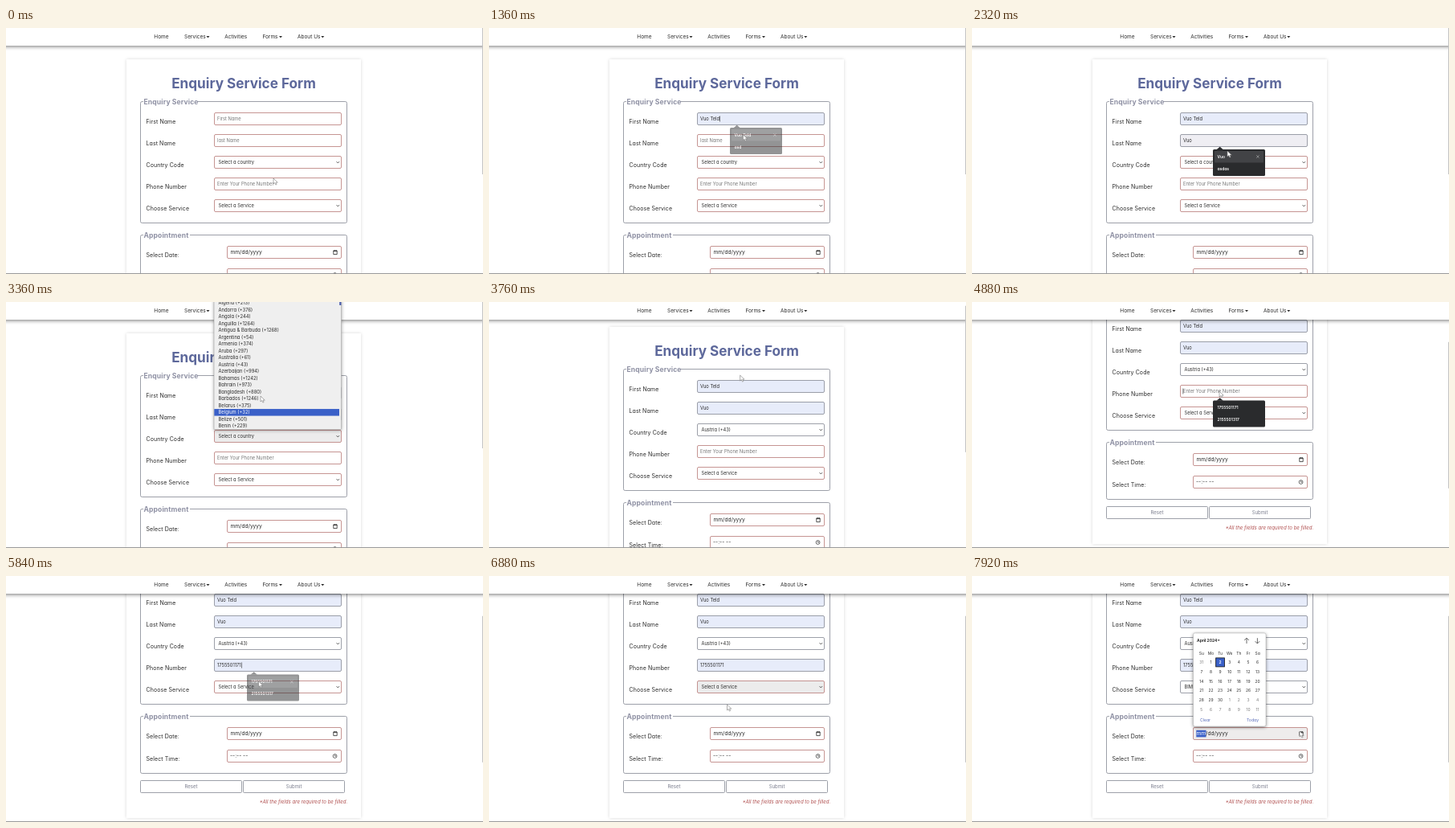
Recreate the animation shown at these times as an HTML page. Size 594x306 px, loop 8000 ms.

```html
<!DOCTYPE html>
<html lang="en">
<head>
<meta charset="utf-8">
<title>Enquiry form</title>
<style>
  html, body { margin: 0; width: 100%; height: 100%; overflow: hidden; background: #fff; }
  svg { display: block; width: 594px; height: 306px; }
  text { font-family: Inter, "Open Sans", sans-serif; font-feature-settings: "cv11"; white-space: pre; }
</style>
</head>
<body>
<svg id="stage" viewBox="0 0 594 306" xmlns="http://www.w3.org/2000/svg">
  <defs>
    <filter id="soft" x="-10%" y="-10%" width="120%" height="120%"><feGaussianBlur stdDeviation="2"/></filter>
    <filter id="navSoft" x="-5%" y="-60%" width="110%" height="220%"><feGaussianBlur stdDeviation="2.4"/></filter>
  </defs>
</svg>
<script>
const LOOP = 8000, STEP = 80;
const INK = '#2a2a2a', RED = '#b87a78', GREY = '#858893', BLUE = '#3a60c8', FILLED = '#e7ecfa';
const FULL_NAME = 'Vuo Teld', LAST_NAME = 'Vuo', PHONE = '1755501171';
const stage = document.getElementById('stage');

function add(parent, tag, attrs = {}, content) {
  const node = document.createElementNS('http://www.w3.org/2000/svg', tag);
  set(node, attrs);
  if (content !== undefined) node.textContent = content;
  parent.appendChild(node);
  return node;
}
function set(node, attrs) {
  for (const k in attrs) node.setAttribute(k, attrs[k]);
}
const group = (parent, attrs) => add(parent, 'g', attrs);
const rect = (parent, x, y, width, height, attrs) => add(parent, 'rect', { x, y, width, height, ...attrs });
const path = (parent, d, attrs) => add(parent, 'path', { d, fill: 'none', ...attrs });
// Text placed by its vertical centre.
const label = (parent, x, cy, size, str, attrs) =>
  add(parent, 'text', { x, y: cy + size * 0.36, 'font-size': size, fill: INK, ...attrs }, str);
const show = (node, on) => node.setAttribute('display', on ? 'inline' : 'none');

// Value at time t from [time, ...values] keys, eased between them.
function track(keys, t) {
  let i = 0;
  while (i < keys.length - 2 && t >= keys[i + 1][0]) i++;
  const [a, b] = [keys[i], keys[i + 1]];
  const u = Math.min(1, Math.max(0, (t - a[0]) / (b[0] - a[0])));
  const e = u * u * (3 - 2 * u);
  return a.slice(1).map((v, k) => v + (b[k + 1] - v) * e);
}

/* Page */
const page = group(stage);
rect(page, 150, 39, 292, 345, { fill: '#000', opacity: 0.15, filter: 'url(#soft)' });
rect(page, 150, 39, 292, 345, { fill: '#fff' });
label(page, 296, 68.4, 17.15, 'Enquiry Service Form', { 'text-anchor': 'middle', 'font-weight': 700, fill: '#5d689b' });

const LINE = { 'stroke-width': 0.8 };
function fieldset(y, height, title, gap) {
  rect(page, 167.5, y, 257, height, { rx: 2, fill: 'none', stroke: GREY, ...LINE });
  rect(page, 171, y - 2, gap, 4, { fill: '#fff' });
  label(page, 171.5, y, 8.6, title, { 'font-weight': 700, fill: '#8f91a4', 'letter-spacing': 0.1 });
}
fieldset(91.5, 151, 'Enquiry Service', 67);
fieldset(257.5, 71, 'Appointment', 58);

function field(cy, name, x, hint, kind) {
  label(page, 174.5, cy + 3.2, 7, name, { 'letter-spacing': 0.08 });
  const box = rect(page, x + 0.5, cy - 7.5, 417 - x, 15, { rx: 1.5, fill: '#fff', stroke: RED, ...LINE });
  const tx = kind === 'select' ? 264.5 : x + 4;
  const size = kind === 'picker' ? 6.7 : 5.75;
  const text = label(page, tx, cy - 0.1, size, hint, kind ? {} : { fill: '#777' });
  if (kind === 'select')
    path(page, `M411.6 ${cy - 0.8}l1.7 1.7l1.7-1.7`, { stroke: INK, 'stroke-width': 0.8 });
  const caret = rect(page, tx, cy - 3.5, 0.6, 7, { fill: INK });
  show(caret, false);
  return { box, text, hint, caret, tx };
}
const first = field(113, 'First Name', 259, 'First Name');
const last = field(140, 'Last Name', 259, 'last Name');
const country = field(167, 'Country Code', 259, 'Select a country', 'select');
const phone = field(194, 'Phone Number', 259, 'Enter Your Phone Number');
const service = field(221, 'Choose Service', 259, 'Select a Service', 'select');
const date = field(279, 'Select Date:', 275, '', 'picker');
field(307, 'Select Time:', 275, '--:-- --', 'picker');

const mark = rect(page, 279.3, 274.8, 12.2, 8.6, { fill: BLUE });
const month = label(page, 279.5, 279, 6.6, '');
const monthPart = add(month, 'tspan', {}, 'mm');
add(month, 'tspan', {}, '/dd/yyyy');
path(page, 'M407.8 277h4.4v4.6h-4.4zM407.8 277.6h4.4M408.9 276v1M411.1 276v1', { stroke: INK, 'stroke-width': 0.8 });
path(page, 'M407.2 307a2.4 2.4 0 1 0 4.8 0a2.4 2.4 0 1 0 -4.8 0M409.6 305.5v1.6h1.3', { stroke: INK, 'stroke-width': 0.7 });

for (const [x, str] of [[167.5, 'Reset'], [295.5, 'Submit']]) {
  rect(page, x, 337.5, 126, 15, { rx: 1, fill: '#fff', stroke: GREY, ...LINE });
  label(page, x + 63, 345, 6, str, { 'text-anchor': 'middle', fill: '#7b7e8e' });
}
label(page, 425.3, 363.5, 6.1, '*All the fields are required to be filled.',
  { 'text-anchor': 'end', 'font-style': 'italic', fill: '#b04f4f' });

/* Navigation and window edges */
rect(stage, -10, 2, 614, 21, { fill: '#000', opacity: 0.55, filter: 'url(#navSoft)' });
rect(stage, 0, 0, 594, 22, { fill: '#fff' });
for (const [x, str, arrow] of [[184.3, 'Home'], [222, 'Services', 249.5], [272.2, 'Activities'], [319.4, 'Forms', 340], [363, 'About Us', 392.3]]) {
  label(stage, x, 11, 6.5, str);
  if (arrow) path(stage, `M${arrow} 9.9h4l-2 2.3z`, { fill: INK });
}
const thumb = rect(stage, 593, 0, 1, 182, { fill: '#c4c4c4' });
rect(stage, 0, 305, 594, 1, { fill: '#9a9a9a' });

/* Autofill suggestions */
function suggest(y, entries, open, hover, pick) {
  const g = group(stage);
  path(g, `M304.5 ${y + 0.3}l4.2-3.6l4.2 3.6z`, { fill: '#2a2b2d' });
  rect(g, 300, y, 65, 33, { rx: 1.5, fill: '#2a2b2d' });
  const row = rect(g, 302, y + 2, 61, 14.5, { rx: 1, fill: '#424346' });
  entries.forEach((str, i) =>
    label(g, 305.5, y + 9.2 + i * 14.8, 4.9, str, { fill: '#fff', 'font-weight': 600 }));
  const cross = path(g, `M354.2 ${y + 7.3}l3.4 3.4m0-3.4l-3.4 3.4`, { stroke: '#bbb', 'stroke-width': 0.6 });
  return t => {
    show(g, t >= open && t < pick + 160);
    set(g, { opacity: t < pick ? 1 : 1 - (t - pick) / 160 });
    show(row, t >= hover);
    show(cross, t >= hover);
  };
}
const fills = [
  { f: first, value: FULL_NAME, open: 640, hover: 960, pick: 1280, y: 124, others: ['asd'] },
  { f: last, value: LAST_NAME, open: 1840, hover: 2080, pick: 2480, y: 151, others: ['asdas'] },
  { f: phone, value: PHONE, open: 4720, hover: 5120, pick: 5760, y: 122.5, others: ['2155501317'] },
];
for (const s of fills) s.draw = suggest(s.y, [s.value, ...s.others], s.open, s.hover, s.pick);

function drawFill(s, t) {
  const { f } = s, typed = t >= s.hover, done = t >= s.pick;
  f.text.textContent = typed ? s.value : f.hint;
  set(f.text, { fill: typed ? INK : '#777' });
  set(f.box, { fill: done ? FILLED : typed ? '#efeef3' : '#fff', stroke: typed ? GREY : RED });
  show(f.caret, t >= s.open && t < s.pick + 320 && (!typed || done));
  set(f.caret, { x: typed ? f.tx + f.text.getComputedTextLength() + 0.4 : f.tx - 0.4 });
  s.draw(t);
}

/* Native option lists */
const ROW = 8.52;
function options(top, bottom, firstY, items) {
  const g = group(stage);
  rect(g, 259, top + 1, 159, bottom - top, { fill: '#000', opacity: 0.35, filter: 'url(#soft)' });
  rect(g, 259, top, 158.5, bottom - top, { fill: '#efefef', stroke: '#999', 'stroke-width': 0.5 });
  const bar = rect(g, 259.3, 0, 155.7, ROW, { fill: BLUE });
  const texts = items.map((str, i) => label(g, 264.5, firstY + i * ROW, 5.85, str));
  return {
    g,
    draw(y) {
      const n = Math.max(0, Math.min(items.length - 1, Math.round((y - firstY) / ROW)));
      set(bar, { y: firstY + (n - 0.5) * ROW });
      texts.forEach((node, i) => set(node, { fill: i === n ? '#fff' : INK }));
    },
  };
}
const countries = options(-4, 158.7, 1, [
  'Algeria (+213)', 'Andorra (+376)', 'Angola (+244)', 'Anguilla (+1264)', 'Antigua & Barbuda (+1268)',
  'Argentina (+54)', 'Armenia (+374)', 'Aruba (+297)', 'Australia (+61)', 'Austria (+43)',
  'Azerbaijan (+994)', 'Bahamas (+1242)', 'Bahrain (+973)', 'Bangladesh (+880)', 'Barbados (+1246)',
  'Belarus (+375)', 'Belgium (+32)', 'Belize (+501)', 'Benin (+229)']);
rect(countries.g, 415.2, -4, 2.2, 8, { fill: '#4c5fae' });
const services = options(146.5, 191, 151.8, ['Select a Service', 'BIM Services', 'Drafting', 'Modelling', 'Consulting']);

/* Date picker */
const calendar = group(stage);
rect(calendar, 275.5, 72, 90.5, 116, { rx: 2, fill: '#000', opacity: 0.5, filter: 'url(#soft)' });
rect(calendar, 275.5, 71, 90.5, 116, { rx: 2, fill: '#fff', stroke: '#aaa', 'stroke-width': 0.5 });
label(calendar, 280, 80, 4.9, 'April 2024', { 'font-weight': 700 });
path(calendar, 'M305.8 79.3h2.8l-1.4 1.7z', { fill: INK });
path(calendar, 'M342 84v-6.8m-2.8 2.8l2.8-2.8l2.8 2.8M355.4 77.2v6.8m-2.8-2.8l2.8 2.8l2.8-2.8', { stroke: '#444', 'stroke-width': 0.8 });
const colX = c => 285.8 + c * 11.63;
const mid = { 'text-anchor': 'middle' };
['Su', 'Mo', 'Tu', 'We', 'Th', 'Fr', 'Sa'].forEach((d, c) => label(calendar, colX(c), 96, 4.9, d, mid));
rect(calendar, colX(2) - 5.4, 101.9, 10.8, 11, { fill: BLUE, stroke: '#111', 'stroke-width': 0.8 });
for (let i = 0; i < 42; i++) {
  const day = i === 0 ? 31 : i > 30 ? i - 30 : i;
  const fill = i === 2 ? '#fff' : i === 0 || i > 30 ? '#777' : INK;
  label(calendar, colX(i % 7), 107.6 + Math.floor(i / 7) * 11.7, 4.9, day, { ...mid, fill, 'font-weight': i === 2 ? 700 : 400 });
}
label(calendar, 284, 179, 5.1, 'Clear', { fill: '#5468b8' });
label(calendar, 357, 179, 5.1, 'Today', { fill: '#5468b8', 'text-anchor': 'end' });

/* Pointer */
const pointer = path(stage, 'M0 0v7l1.7-1.5l1.2 2.6l1.2-.6l-1.1-2.4h2.3z',
  { fill: '#fff', stroke: '#777', 'stroke-width': 0.6, 'stroke-linejoin': 'round' });
const moves = [
  [0, 333, 187], [160, 333, 187], [560, 312, 112], [720, 312, 112], [1040, 317, 132], [1280, 317, 132],
  [1680, 311, 139], [1920, 311, 139], [2160, 316, 153], [2320, 318, 153], [2560, 318, 153],
  [2800, 322, 166], [2960, 322, 165], [3200, 320, 150], [3280, 319, 137], [3360, 317, 117],
  [3520, 310, 77], [3680, 310, 77], [4000, 327, 167], [4240, 322, 150], [4640, 308, 111],
  [4960, 308, 111], [5280, 314.5, 131], [5840, 314.5, 131], [6160, 300, 138], [6400, 299, 138],
  [6640, 296.5, 160], [6960, 296.5, 160], [7600, 408, 193], [8000, 408, 193]];
const scrolls = [[3680, 0], [3840, 16], [4000, 55], [4160, 77], [4320, 83]];

function drawSelect(f, t, open, shut, value) {
  const chosen = t >= shut;
  f.text.textContent = chosen ? value : f.hint;
  set(f.box, { fill: t >= open && !chosen ? '#ececec' : '#fff', stroke: chosen ? GREY : RED });
}

function draw(t) {
  const scroll = Math.round(track(scrolls, t)[0]);
  set(page, { transform: `translate(0 ${-scroll})` });
  set(thumb, { y: scroll * 0.6 });
  fills.forEach(s => drawFill(s, t));

  const listY = track(moves, t - STEP)[1];
  drawSelect(country, t, 2880, 3600, 'Austria (+43)');
  show(countries.g, t >= 2880 && t < 3600);
  countries.draw(listY);

  drawSelect(service, t, 6320, 6960, 'BIM Services');
  show(services.g, t >= 6320 && t < 6880);
  services.draw(listY);

  const picking = t >= 7760;
  show(calendar, picking);
  show(mark, picking);
  set(monthPart, { fill: picking ? '#fff' : INK });
  set(date.box, { fill: picking ? '#eeecec' : '#fff' });

  const [x, y] = track(moves, t);
  set(pointer, { transform: `translate(${x} ${y})` });
}

const start = performance.now();
function tick(now) {
  const t = Math.max(0, now - start) % LOOP;
  draw(Math.floor(t / STEP) * STEP);
  requestAnimationFrame(tick);
}
draw(0);
requestAnimationFrame(tick);
</script>
</body>
</html>
```
